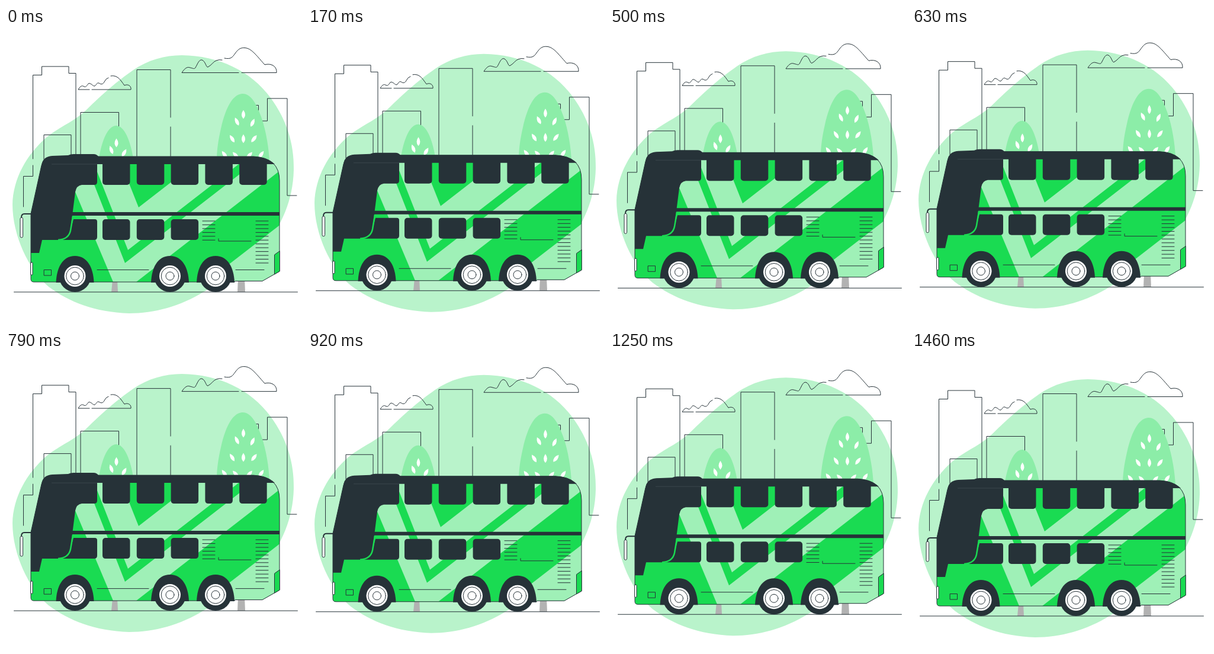
An HTML page that plays this animation: 500x500 px, repeating every 1500 ms.

```html
<!DOCTYPE html>
<html lang="en">
<head>
<meta charset="utf-8">
<title>Double-decker bus</title>
<style>
  html, body { margin: 0; height: 100%; overflow: hidden; background: #fff; }
  svg { display: block; width: 100vw; height: 100vh; }
  .line { fill: none; stroke: #263238; stroke-linecap: round; stroke-linejoin: round; }
  .dark { fill: #263238; }
  .green { fill: #1adb52; }
  .light { fill: #9ff0b7; }
  .tree { fill: #8ceda8; }
  .trunk { fill: #b2b2b2; }
  .white { fill: #fff; }
</style>
</head>
<body>
<svg viewBox="0 0 500 500">
  <defs>
    <path id="shell" d="M60 232Q63 217 80 217H418Q462 219 462 258V411L433 427.500H387L386 429H47Q42 429 42 424V314Z"/>
    <clipPath id="inside"><use href="#shell"/></clipPath>
    <path id="leaf" class="white" d="M0-7.500Q6 1 0 7.500Q-6 1 0-7.500Z"/>
    <g id="wheel">
      <path class="dark" d="M-32 11C-31-14-21-34 0-34S31-14 32 11Z"/>
      <circle class="dark" r="27"/>
      <circle class="white" r="18"/>
      <g class="line"><circle r="14.800"/><circle r="7"/></g>
    </g>
  </defs>
  <g id="scene">
    <path fill="#b9f3cb" d="M297 46C360 47 413 72 447 118C474 155 487 195 486 240C485 290 465 335 438 366C405 402 372 425 335 445C295 470 250 482 208 482C150 480 107 463 72 437C38 408 11 350 11 298C12 255 34 215 68 185C95 164 112 160 135 139C165 110 185 92 215 71C240 54 268 46 297 46Z"/>

    <!-- skyline and clouds -->
    <path class="line" d="M45.500 221V79.500H60.500V65H106V76.500H118V216M45.500 232V250.500H29.500V302M64 222V180.500H110V216M126 216V142.500H190.500V167M221 217V70.500H278V151M278 167V217M419 130.500H426.500V148M429 157H441.500V119H475V283H491"/>
    <path class="line" d="M393 75.500H297C302 68 306 65 311 67C316 68 318 70 320 67C324 60 326 53 331 54C337 56 338 67 341 66C347 63 350 57 355 55Q360 53 365 54M369 51C380 53 382 50 387 43C392 36 396 33 403 33.500C414 34 421 44 437 62C447 59 458 64 457 75.500H398"/>
    <path class="line" d="M141 104H122C126 97 129 97 132 99C136 101 137 95 140 93.500C144 93 147 99 150 98C153 96 153 92 157 93C161 96 164 95 166 91Q168 86 173 84M177 81C188 79 193 87 200 97C206 94 212 98 211 104H145"/>

    <path class="trunk" d="M180 425H188L189 446H178ZM392 422H403L404 446H391Z"/>
    <path class="tree" d="M400 111C385 111 372 130 363 170C358 192 356 208 356 225H445C444 205 440 175 431 150C421 122 411 111 400 111ZM186 165C172 165 162 190 157 220H215C210 190 200 165 186 165Z"/>
    <g id="leaves"></g>
    <path class="line" d="M13.500 446H492.500"/>

    <!-- bodywork -->
    <use href="#shell" class="green"/>
    <g clip-path="url(#inside)">
      <path class="light" d="M97 229.500L181 429H220L480 227.500V217Z"/>
      <path class="green" d="M131.500 220L201 397L429.500 220H406L206 375L145 220Z"/>
      <path class="green" d="M191 220L224 303L331 220Z"/>
      <path class="light" d="M470 327L338 429H470Z"/>
    </g>
    <use href="#shell" class="line"/>
    <path class="dark" d="M60 232Q62 217 78 216L105 215Q109 213 114 213H148Q153 213 156 217H418Q441 218 454 230H154V260Q154 265 149 265H128Q119 266 117 277L109 340Q106 358 90 358H61L56 380H42V314Z"/>
    <path class="dark" d="M112 311H462V317H111ZM114 323H150Q154 323 154 327V353Q154 358 149 358H90Q107 356 109 342Z"/>
    <path fill="none" stroke="#1adb52" stroke-width="2.500" d="M113 318L109 342Q106 357 88 358"/>
    <path fill="none" stroke="#3a464c" d="M77 230H154"/>
    <g id="windows" class="dark"></g>
    <path id="vents" class="line"/>
    <path class="line" d="M359 356V360H414M154 408.500H241M388 408.500H436M64.500 408.500H76.500V418H64.500Z"/>
    <path class="line" style="fill:#1adb52" d="M462 377L453.500 383V416L462 411Z"/>
    <path class="line" stroke-width="2" d="M43 314H31Q26 314 26 320"/>
    <g class="line" style="fill:#fff">
      <rect x="24" y="320" width="4.500" height="34" rx="2.200"/>
      <rect x="41.500" y="396" width="3.500" height="21" rx="1"/>
    </g>
    <use href="#wheel" x="116.500" y="419"/>
    <use href="#wheel" x="277" y="419"/>
    <use href="#wheel" x="354" y="419"/>
  </g>
</svg>
<script>
  const $ = id => document.getElementById(id);

  // x, y, tilt
  const leaves = [
    [401, 146, 0], [390, 158, -25], [416.500, 160, 25],
    [401, 187, 0], [382, 187, -32], [419, 187, 38],
    [369, 214, -35], [388, 215, -42], [411, 215, 42], [431, 214, 35],
    [186.500, 194, 0], [178, 206, -20], [199.500, 211, 30]
  ];
  $('leaves').innerHTML = leaves.map(([x, y, tilt]) =>
    `<use href="#leaf" transform="translate(${x} ${y}) rotate(${tilt})"/>`).join('');

  const windowRow = (count, y, height) => Array.from({ length: count }, (_, i) =>
    `<rect x="${163 + i * 57.800}" y="${y}" width="46.500" height="${height}" rx="5"/>`).join('');
  $('windows').innerHTML = windowRow(5, 222, 43) + windowRow(3, 323, 35);

  const slats = (x, count) => Array.from({ length: count }, (_, i) =>
    `M${x} ${326 + i * 6.450}h21`).join('');
  $('vents').setAttribute('d', slats(332, 6) + slats(422, 12));

  // Linear rise and fall of 10 units, stepped at 24 pictures per second
  const steps = 36;
  const lift = step => 10 * (1 - Math.abs(1 - (step + 0.5) / (steps / 2)));

  const start = performance.now();
  function draw(now) {
    const time = Math.max(0, now - start);
    const step = Math.floor((time + 5) * 0.024) % steps;
    $('scene').setAttribute('transform', `translate(0 ${lift(0) - lift(step)})`);
    requestAnimationFrame(draw);
  }
  draw(start);
</script>
</body>
</html>
```
